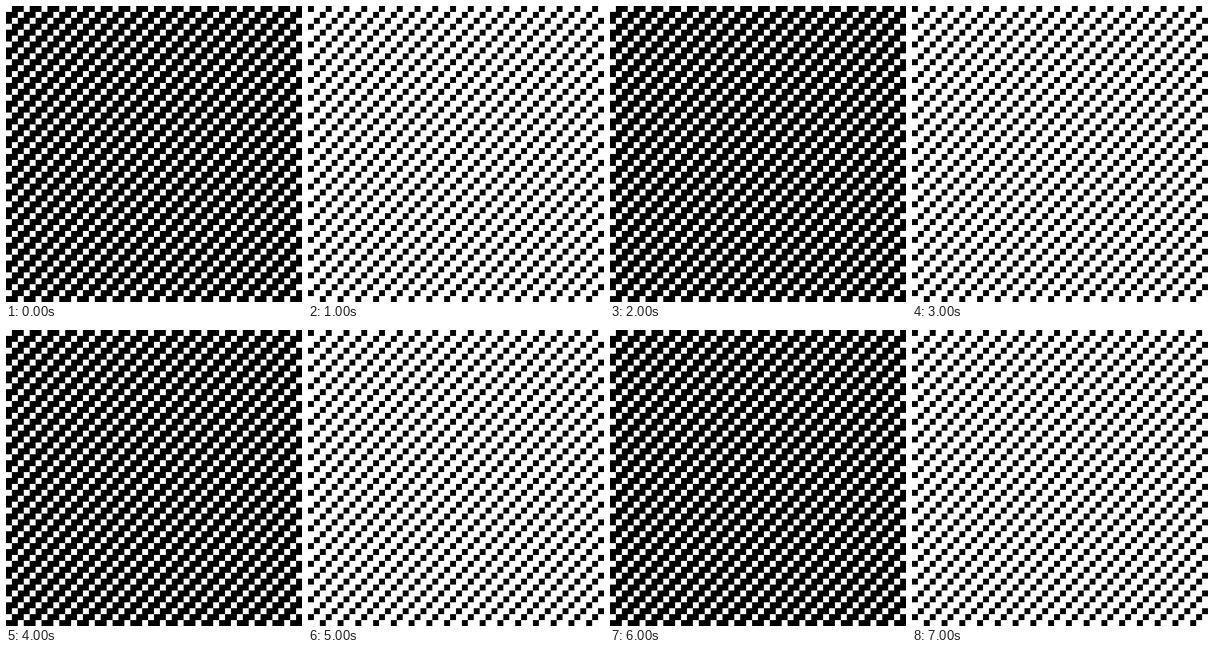
An HTML page with a canvas for the animation above (8 s loop, 500 px wide and 500 px high).

```html
<!DOCTYPE html>
<html lang="en">
<head>
<meta charset="utf-8">
<title>Inverting diagonal cells</title>
<style>
  html, body { margin: 0; width: 100%; height: 100%; overflow: hidden; background: #000; }
  canvas { display: block; }
</style>
</head>
<body>
<canvas id="stage" width="500" height="500"></canvas>
<script>
  const ctx = document.getElementById('stage').getContext('2d');
  const SIZE = 500, CELL = 10, BEAT = 1000;
  const start = performance.now();
  let shown = -1;

  function draw(inverted) {
    ctx.fillStyle = inverted ? '#fff' : '#000';
    ctx.fillRect(0, 0, SIZE, SIZE);
    ctx.fillStyle = inverted ? '#000' : '#fff';
    for (let row = 0; row < SIZE / CELL; row++) {
      // Every third cell, shifted one cell left per row
      for (let col = (3 - row % 3) % 3; col < SIZE / CELL; col += 3) {
        ctx.fillRect(col * CELL, row * CELL, CELL, CELL);
      }
    }
  }

  function tick() {
    const phase = Math.floor((performance.now() - start) / BEAT) % 2;
    if (phase !== shown) draw(shown = phase);
    requestAnimationFrame(tick);
  }
  tick();
</script>
</body>
</html>
```
